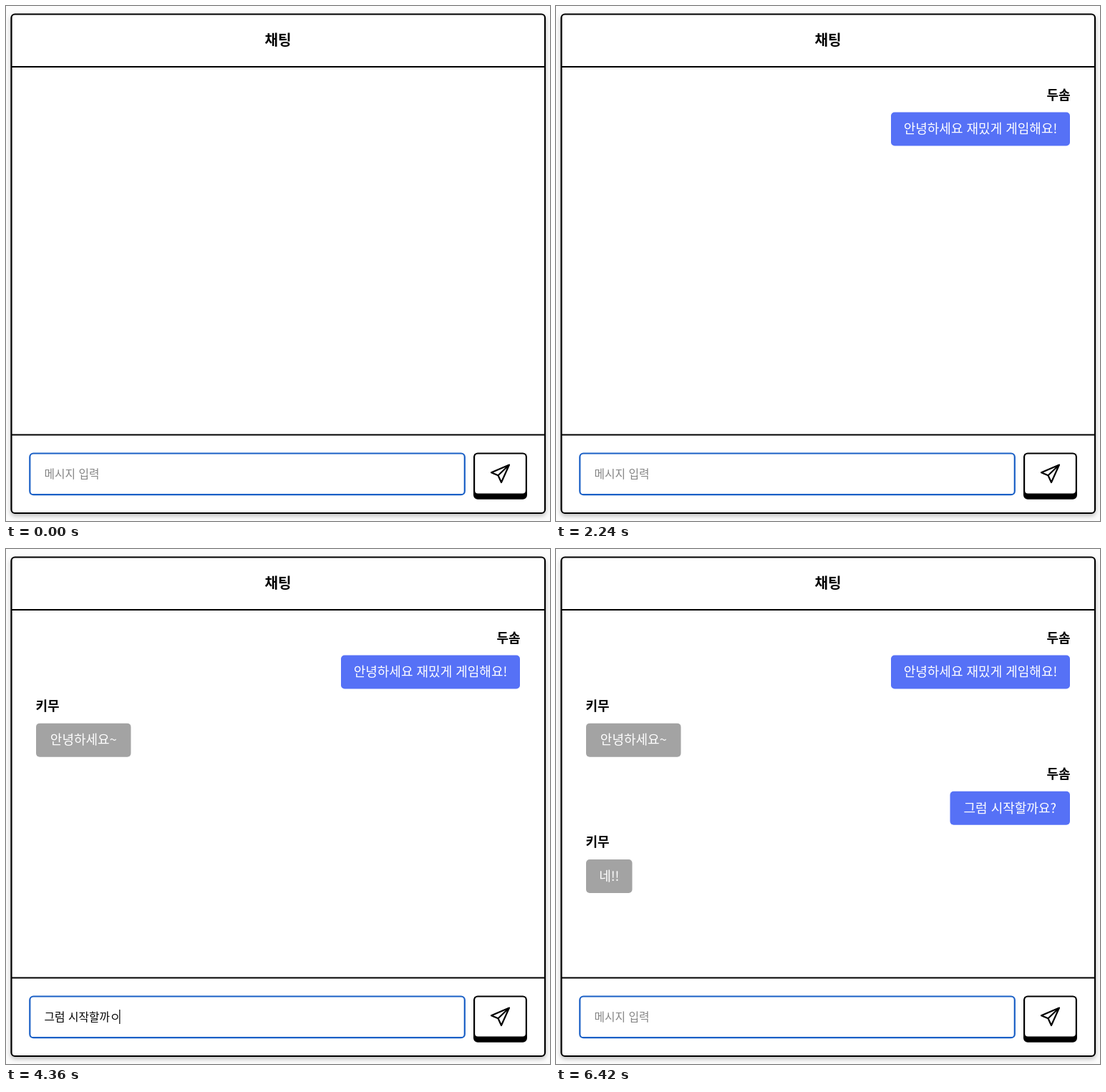
Write an HTML page that moves like this. It is 760 px wide and 720 px high and loops after 6.47 s.

```html
<!DOCTYPE html>
<html lang="ko">
<head>
<meta charset="utf-8">
<style>
  html, body { margin: 0; width: 760px; height: 720px; overflow: hidden; background: #fcfcfc; }
  svg { display: block; font-family: "Noto Sans CJK KR", "Noto Sans KR", "Noto Sans", sans-serif; }
  .card { filter: drop-shadow(0 3px 3px rgba(0, 0, 0, .25)); }
  .line { fill: none; stroke: #000; stroke-width: 2.2; }
  .name { font-size: 18px; font-weight: 700; }
  .talk { font-size: 18px; fill: #fff; }
  .field { font-size: 15.75px; white-space: pre; }
</style>
</head>
<body>
<svg width="760" height="720" viewBox="0 0 760 720">
  <rect class="card" x="7.5" y="11.5" width="745.5" height="697.5" rx="5" fill="#fff" stroke="#000" stroke-width="2.2"/>
  <path class="line" d="M7.5 85H753M7.5 599.5H753"/>
  <text x="380" y="54.6" text-anchor="middle" font-size="20.2" font-weight="700">채팅</text>
  <g id="chat"></g>
  <rect x="33.3" y="625.5" width="607.5" height="57.7" rx="5" fill="#fff" stroke="#1b60c6" stroke-width="2.2"/>
  <text id="field" class="field" x="53.6" y="659.8"></text>
  <path id="caret" d="M0 644V664" stroke="#000" stroke-width="1.2"/>
  <rect x="653" y="624.4" width="75" height="65.4" rx="6"/>
  <rect x="655.2" y="626.6" width="70.6" height="55" rx="4" fill="#fff"/>
  <path class="line" stroke-linejoin="round" d="M703 641.5L678 652.3L687.5 656.3L692 666ZL687.5 656.3"/>
  <path id="mouse" d="M0 0V16L3.8 12.6L6.6 18.6L9.4 17.3L6.7 11.5H11.6Z" stroke="#fff"/>
</svg>
<script>
const LOOP = 6470, BLINK = 530;
const get = id => document.getElementById(id);
const [chat, field, caret, mouse] = ['chat', 'field', 'caret', 'mouse'].map(get);

// at: time shown, w: bubble width
const talks = [
  { me: true, at: 1650, w: 250, text: '안녕하세요 재밌게 게임해요!' },
  { me: false, at: 3360, w: 132.5, text: '안녕하세요~' },
  { me: true, at: 4560, w: 167.5, text: '그럼 시작할까요?' },
  { me: false, at: 6140, w: 64.5, text: '네!!' }
];

// from..to: keystrokes, sent: field cleared, blink: caret phase
const drafts = [
  { from: 50, to: 760, sent: 1650, blink: 1650, text: talks[0].text },
  { from: 3970, to: 4430, sent: 4560, blink: 4305, text: talks[2].text }
];

// Every state of the field while Hangul is being composed
function keystrokes(text) {
  const initials = 'ㄱㄲㄴㄷㄸㄹㅁㅂㅃㅅㅆㅇㅈㅉㅊㅋㅌㅍㅎ';
  const states = [];
  let done = '';
  for (const ch of text) {
    const n = ch.charCodeAt(0) - 0xAC00;
    if (n >= 0) {
      states.push(done + initials[Math.floor(n / 588)]);
      if (n % 28) states.push(done + String.fromCharCode(0xAC00 + n - n % 28));
    }
    states.push(done += ch);
  }
  return states;
}
drafts.forEach(d => d.keys = keystrokes(d.text));

talks.forEach((m, i) => {
  const y = 148.5 + i * 95.15, x = m.me ? 718 - m.w : 42;
  chat.insertAdjacentHTML('beforeend', `<g>
    <text class="name" x="${m.me ? 718.5 : 41.5}" y="${y - 17.6}" text-anchor="${m.me ? 'end' : 'start'}">${m.me ? '두솜' : '키무'}</text>
    <rect x="${x}" y="${y}" width="${m.w}" height="47" rx="5" fill="${m.me ? '#5671f6' : '#a3a3a3'}"/>
    <text class="talk" x="${x + m.w / 2}" y="${y + 29.8}" text-anchor="middle">${m.text}</text></g>`);
});

const show = (el, on) => el.setAttribute('visibility', on ? 'visible' : 'hidden');

function draw(now) {
  const t = now % LOOP;
  talks.forEach((m, i) => show(chat.children[i], t >= m.at));

  const d = drafts[t < drafts[1].from ? 0 : 1];
  const typing = t >= d.from && t < d.sent;
  const step = Math.floor((t - d.from) / (d.to - d.from) * d.keys.length);
  field.textContent = typing ? d.keys[Math.min(step, d.keys.length - 1)] : '메시지 입력';
  field.setAttribute('fill', typing ? '#000' : '#858585');

  const x = 54 + (typing ? field.getComputedTextLength() - 1 : 0);
  caret.setAttribute('transform', `translate(${x} 0)`);
  show(caret, typing || t > d.sent && Math.floor((t - d.blink) / BLINK) % 2 === 0);

  const k = Math.min(1, Math.max(0, (t - 3500) / 260));
  mouse.setAttribute('transform', `translate(${364 + 8 * (1 - k) ** 2} ${673 + 20 * (1 - k) ** 2})`);
  show(mouse, t >= 3500 && t < drafts[1].from);
  requestAnimationFrame(draw);
}
requestAnimationFrame(draw);
</script>
</body>
</html>
```
